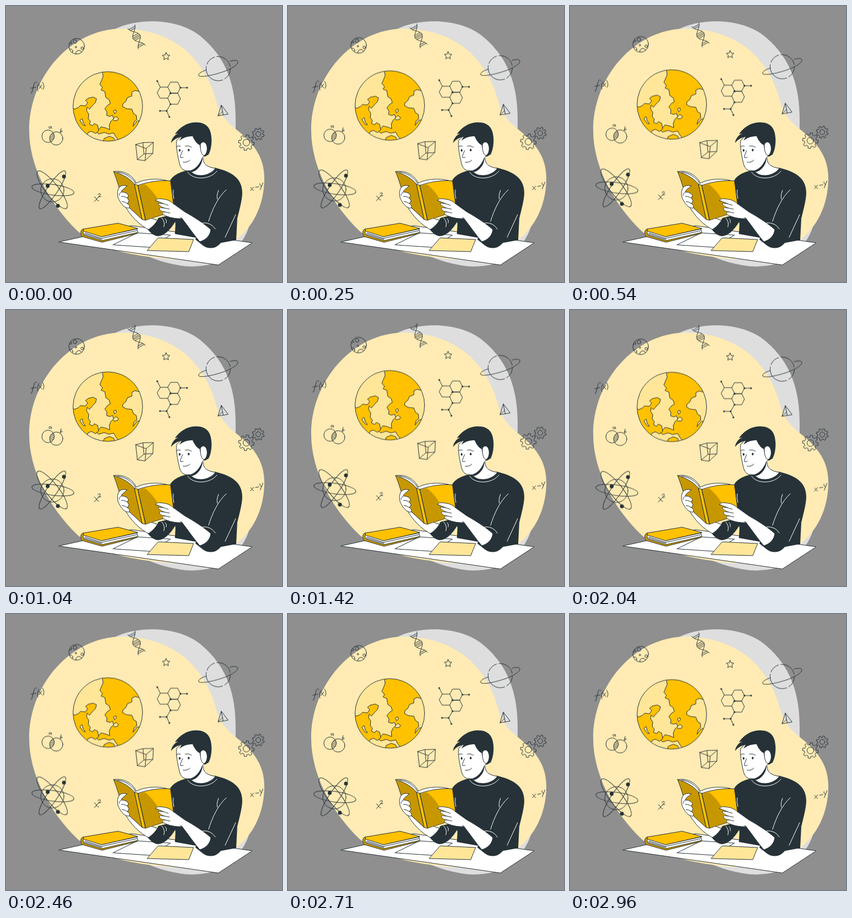
Write an HTML page that moves like this. It is 500 by 500 pixels and loops after 3 s.

```html
<!DOCTYPE html>
<html lang="en">
<head>
<meta charset="utf-8">
<title>Reading about science</title>
<style>
  html, body { margin: 0; width: 100%; height: 100%; overflow: hidden; background: #8f8f8f; }
  svg { display: block; width: 100vw; height: 100vh; }
  .line { fill: none; stroke: #263238; stroke-width: 1; stroke-linecap: round; stroke-linejoin: round; }
  .ink { fill: #263238; }
  .gold { fill: #ffc100; }
  .ochre { fill: #c79700; }
  .skin { fill: #fff; }
  .seam { fill: none; stroke: #fff; stroke-width: 1; stroke-linecap: round; }
  .edge { stroke: #263238; stroke-width: 1; stroke-linejoin: round; stroke-linecap: round; }
</style>
</head>
<body>
<svg viewBox="0 0 500 500">
  <defs>
    <clipPath id="disc"><circle cx="184.5" cy="182" r="63"/></clipPath>
    <clipPath id="moonDisc"><circle cx="128" cy="73" r="14.2"/></clipPath>
    <clipPath id="setA"><circle cx="76.3" cy="236" r="11.3"/></clipPath>
    <clipPath id="setB"><circle cx="91" cy="240" r="12"/></clipPath>
  </defs>

  <!-- backdrop -->
  <path fill="#dedede" d="M195 43C240 20 315 22 355 57C400 95 416 145 416 205V235L440 400C437 410 432 419 426 428L400 455C380 470 342 475 315 470C290 466 265 458 245 448Z"/>
  <path fill="#ffebb3" d="M210 41C118 41 42 128 42 225C42 290 78 358 130 408C170 442 230 452 290 458C350 462 396 446 427 415C458 385 468 345 468 312C468 275 450 250 420 226C398 208 388 197 380 170C370 130 345 92 312 70C282 50 245 41 210 41Z"/>

  <g id="sky">
    <!-- globe -->
    <circle fill="#ffe699" cx="184.5" cy="182" r="63"/>
    <g clip-path="url(#disc)" class="gold edge">
      <path d="M174 116L176 128 173 135 170 142 175 148 172 152 179 155 181 166 187 170 189 177 184 180 179 186 183 192 182 198 188 200 193 198 195 204 190 209 187 216 188 224 181 221 172 219 168 224 163 228 168 232 178 229 186 232 195 230 199 237 203 242 215 250 245 230 250 205 237 209 230 218 232 210 237 206 236 198 231 195 228 187 218 186 211 182 212 177 217 173 220 166 228 163 228 156 234 153 241 155 258 150 240 115Z"/>
      <path d="M115 180L124 187 131 184 135 180 144 181 148 175 144 171 149 167 158 165 164 168 162 175 157 180 151 187 147 183 146 190 150 196 149 204 153 209 151 214 157 217 160 213 166 216 168 226 162 231 155 227 149 229 146 236 138 245 100 200Z"/>
      <path d="M175 248L178 240 187 236 195 239 199 247Z"/>
      <path fill="#ffe699" d="M195 190L199 188 200 192 197 195ZM194 205L199 200 204 204 202 207 196 208ZM134 207L138 204 140 212 144 217 140 216Z"/>
    </g>
    <circle class="line" cx="184.5" cy="182" r="63"/>

    <g class="line">
      <!-- moon -->
      <circle cx="128" cy="73" r="14.2"/>
      <g clip-path="url(#moonDisc)">
        <circle cx="125" cy="64.5" r="3.3"/><circle cx="126.5" cy="74.5" r="1.4"/>
        <circle cx="138" cy="76.5" r="2.3"/><circle cx="132" cy="86" r="5.5"/>
        <circle cx="117" cy="82" r="4"/><circle cx="117" cy="67" r="2"/>
      </g>
      <path id="dna"/>
      <path id="star"/>

      <!-- ringed planet -->
      <circle cx="384.5" cy="113.5" r="22" pathLength="100" stroke-dasharray="16 3 34 3 14 3 24 3"/>
      <path d="M363 116C353 119 348 123 349 126C352 130 374 126 394 119C410 113 421 106 420 101C419 98 413 98 406 100"/>

      <!-- molecule -->
      <path d="M274 157L279.5 147H293L298 157 293 167H279.5ZM293 147L298 138H311L316 148 311 158H298M298 158H311L316 168 311 178H298L293 167M274 136L279.5 147M316 148H328M298 178L291 190H279M291 190L296 201"/>

      <!-- pyramid, cube -->
      <path d="M390 180L384 199 402 196ZM390 180L393.5 197M384 199L392 191.500"/>
      <path d="M235 251L248 247.500 267 247 254 258ZM238 278L250 268 266 267 252 280ZM235 251L238 278M248 247.500L250 268M267 247L266 267M254 258L252 280"/>

      <!-- gears -->
      <path id="gearA"/><circle cx="435.5" cy="247.5" r="6"/>
      <path id="gearB"/><circle cx="457" cy="232" r="4.5"/>

      <!-- two sets -->
      <circle cx="76.3" cy="236" r="11.3"/><circle cx="91" cy="240" r="12"/>
      <g clip-path="url(#setA)"><path clip-path="url(#setB)" d="M76 234L90 226M76 237L90 229M76 240L90 232M76 243L90 235M76 246L90 238M76 249L90 241"/></g>

      <!-- atom -->
      <circle cx="84" cy="334" r="21"/>
      <ellipse rx="38.5" ry="9.5" transform="translate(85 333)rotate(8)"/>
      <ellipse rx="42.5" ry="11.5" transform="translate(83.5 333)rotate(52)"/>
      <ellipse rx="41" ry="9.5" transform="translate(84 333)rotate(-56)"/>

      <!-- handwriting -->
      <g role="img" aria-label="f(x)"><path d="M56 139C55 136 52 137 51 141L47 156Q46 159 45 158M45 149L54 147M60 140C57 144 56 149 58 154M60 143.5C62 143 62 150 65 149M65 143L59.5 150M66 138C69 142 70 147 67 151"/></g>
      <g role="img" aria-label="a b"><path d="M81.5 219C79 217 77 219 78 221C79 223 81 221 82 218.5Q81 222 83 222M100 222L98 229C101 229.5 103 227 101 226Q99.5 226 98.5 228"/></g>
      <g role="img" aria-label="x²"><path d="M160 346C163 345 164 354 168 353M168 345.5L160 354.5M166.5 342C167 339.5 171 339 171 341Q170 344 167.5 346L172 345"/></g>
      <g role="img" aria-label="x−y"><path d="M443 329C445 328 446 335 448.5 334M448.5 328L443 334.5M452 328.5L458 327.5M460 322Q460 327 463 326.5M465.5 320.5L460.5 333"/></g>
    </g>
    <g class="ink" id="dots"></g>
  </g>

  <!-- table -->
  <path class="skin edge" stroke-width=".8" d="M96 427.5L228 398 446 429 385 469Z"/>
  <path class="skin edge" d="M194 432.5L238 411 298 415 262 437Z"/>
  <path class="edge" fill="#ffe699" d="M276 420L340 423 331 445 256 443Z"/>

  <!-- closed book -->
  <path class="ochre edge" d="M140 404C134 405 134 415 139 418L174 428 238 412V409L175 424 143 415Z"/>
  <path class="skin edge" d="M141 406L173 418 237 404 239 410 174 425 142 415Q138 411 141 406Z"/>
  <path class="gold edge" d="M140 404L203 393.5 239 403 173 418 141 408Z"/>
  <path class="line" stroke-width=".7" d="M143 411L173 421 237 407M142 413L174 423"/>

  <!-- torso and far arm -->
  <path class="ink" d="M333 297C316 300 302 306 297 317C299 350 303 375 307 395L306 413 345 420 390 429 417 424 419 385C424 365 428 350 428 338C428 308 402 299 379 293Z"/>
  <path class="skin edge" d="M213 358C225 380 242 398 262 407L279 390 245 378Z"/>
  <path class="ink" d="M257 405C264 401 273 392 276 384L308 376 307 390C298 405 288 416 275 417C267 416 262 411 257 405Z"/>
  <path class="seam" d="M282 384Q289 391 286 400M288 385Q292 388 290 393"/>

  <!-- open book -->
  <path class="skin edge" d="M196 300C212 297 229 306 236 321C250 313 278 311 297 318L300 340 238 350Z"/>
  <path class="line" stroke-width=".8" d="M202 301C216 302 229 311 235 322"/>
  <path class="ochre edge" d="M195 300C210 304 224 312 233 323L247 387 214 357C208 340 203 320 195 300Z"/>
  <path class="gold edge" d="M233 323L240 325 253 388 247 387Z"/>
  <path class="gold edge" d="M239 325C258 318 281 315 298 317L305 371C286 378 269 382 253 388Z"/>
  <path class="ochre" d="M240 325L252 323C262 332 270 340 274 349L284 377 253 387.5Z"/>
  <path class="line" d="M239 325L253 388"/>

  <!-- far hand -->
  <path class="skin edge" d="M219 326C212 323 204 327 203 333C201 340 202 347 206 353C210 361 217 367 223 366C225 363 223 360 220 358L223 353 220 348 222 343 218 339C214 337 211 337 209 337C210 332 215 331 219 326Z"/>
  <path class="line" d="M209 337Q205 339 205 343M220 348Q213 344 209 345M220 358Q214 354 210 354"/>

  <!-- near arm -->
  <path class="ink" d="M427 336C428 350 424 362 417 376C409 400 396 425 384 434C377 440 365 440 357 434L343 423 355 394 370 360Z"/>
  <path class="skin edge" d="M271 352C273 348 279 349 286 350C294 351 299 354 303 358L324 373C342 383 360 395 371 405C370 416 362 424 351 427C340 414 330 399 319 385C308 386 294 383 285 378C282 375 284 373 288 373C282 373 277 369 278 366C279 365 284 366 287 366C281 364 275 360 276 357L285 358Z"/>
  <path class="line" d="M285 358L294 361M287 366L296 368M288 373L297 375M319 385L316 383"/>
  <path class="seam" d="M356 393C367 392 375 397 379 404M399 333C384 346 373 370 367 390M385 334Q381 343 383 350M416 378L397 419M303 333Q302 340 304 349"/>

  <!-- neck and head -->
  <path class="skin" d="M335 290L333 297C342 311 368 309 379 294C366 293 359 288 356 272Z"/>
  <path class="line" d="M357 276C357 287 365 292 379 294"/>
  <path class="seam" d="M329 301C340 317 371 314 382 299"/>
  <path class="skin edge" d="M309 244C308 260 312 276 315 288C318 297 325 300 335 298C345 295 352 285 356 275L364 265V235L330 225Z"/>
  <path class="ink" d="M334 299C345 294 352 286 355.500 274C357 286 347 299 336 301Z"/>
  <path class="ink" d="M299 248C300 240 305 234 312 231L306 232C315 219 331 209 347 211C358 211 367 217 370 227C374 239 373 258 367 269L360 273C354 268 352 260 351 252C345 249 341 243 338 236C329 236 322 238 314 244L318 237C310 238 303 243 299 248Z"/>
  <path class="skin edge" d="M352 251C354 245 361 245 363 251C366 258 364 268 359 271C354 270 352 262 352 251Z"/>
  <path class="line" d="M320 262C318 266 316 271 316 274Q318 276 321 274M321 283Q329 284 333 279"/>
  <path class="line" d="M309 255Q312 252 316 254M325 254Q331 252 336 256"/>
  <g class="ink"><ellipse cx="314.5" cy="261.5" rx="1.7" ry="2.3"/><ellipse cx="331" cy="261" rx="1.7" ry="2.3"/></g>
</svg>

<script>
  const $ = id => document.getElementById(id);
  const draw = (id, d) => $(id).setAttribute('d', d);
  const join = pts => pts.map((p, i) => (i ? 'L' : 'M') + p.map(v => v.toFixed(2))).join('');
  const polar = (cx, cy, r, a) => [cx + r * Math.cos(a), cy + r * Math.sin(a)];
  const TAU = Math.PI * 2;

  function gear(cx, cy, inner, outer, teeth, turn) {
    const pts = [];
    for (let i = 0; i < teeth; i++)
      for (const [r, s] of [[inner, -.28], [outer, -.2], [outer, .2], [inner, .28]])
        pts.push(polar(cx, cy, r, turn + (i + s) * TAU / teeth));
    return join(pts) + 'Z';
  }

  // Point on the helix: t along the axis, k across it
  const helix = (t, k) => {
    const w = 7 * k * Math.cos(t * TAU);
    return [227 + 19 * t + .88 * w, 37.5 + 37 * t - .47 * w];
  };
  const strand = k => join(Array.from({ length: 31 }, (_, i) => helix(i / 30, k)));
  const rungs = [.06, .13, .4, .47, .53, .6, .87, .94];
  draw('dna', strand(1) + strand(-1) + rungs.map(t => join([helix(t, 1), helix(t, -1)])).join(''));

  draw('star', join(Array.from({ length: 10 }, (_, i) =>
    polar(290, 91.5, i % 2 ? 3.4 : 7.2, i * TAU / 10 - TAU / 4))) + 'Z');
  draw('gearA', gear(435.5, 247.5, 11, 14.3, 8, .15));
  draw('gearB', gear(457, 232, 8.3, 11, 8, .3));

  const dots = [
    [105, 309, 3.5], [75.5, 326, 3.5], [94, 362, 3.5],
    [274, 136, 1.6], [328, 148, 1.6], [316, 148, 1.6], [298, 158, 1.8],
    [298, 178, 1.6], [279, 190, 1.6], [291, 190, 1.6], [296, 201, 1.6]
  ];
  $('dots').innerHTML = dots.map(([x, y, r]) => `<circle cx="${x}" cy="${y}" r="${r}"/>`).join('');

  $('sky').animate(
    [0, -10, 0].map(y => ({ transform: `translateY(${y}px)` })),
    { duration: 3000, iterations: Infinity }
  );
</script>
</body>
</html>
```
